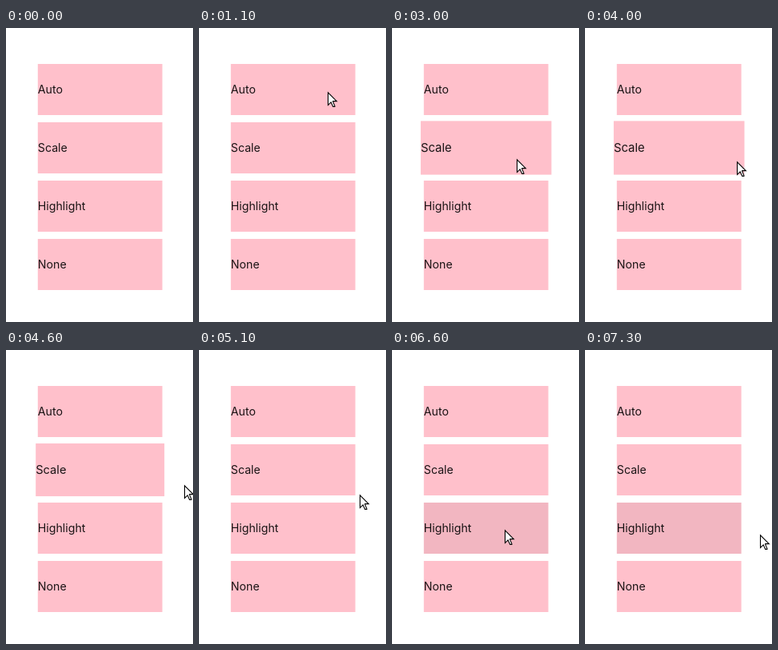
An HTML page that plays this animation: 234x368 px, repeating every 8000 ms.

```html
<!DOCTYPE html>
<html lang="en">
<head>
<meta charset="utf-8">
<title>Hover effects</title>
<style>
  html, body { margin: 0; width: 100%; height: 100%; overflow: hidden; background: #fff; }
  svg { display: block; }
  text { font: 14.2px Inter, "Noto Sans", sans-serif; fill: #000; fill-opacity: .9; }
</style>
</head>
<body>
<svg id="stage" width="234" height="368" viewBox="0 0 234 368"></svg>
<script>
const LOOP = 8000, TICK = 100;
const BOX = { x: 39.8, y: 45, w: 155.8, h: 64, pitch: 73 };
const START = [230, 133];

// Pointer moves: start time, ticks, end point, sideways bow
const MOVES = [
  [300, 4, 203, 100, 0],
  [800, 4, 161, 80, 0],
  [1800, 6, 156, 164, -7.5],
  [4000, 2, 223, 169, 0],
  [5000, 7, 112, 228, 0],
  [6600, 3, 225, 216, 0],
  [7200, 2, 219, 231, 0]
];

const stage = document.getElementById("stage");

function add(parent, tag, attrs, label) {
  const el = document.createElementNS(stage.namespaceURI, tag);
  for (const key in attrs) el.setAttribute(key, attrs[key]);
  if (label) el.textContent = label;
  parent.appendChild(el);
  return el;
}

const cards = ["Auto", "Scale", "Highlight", "None"].map((label, i) => {
  const y = BOX.y + i * BOX.pitch;
  const group = add(stage, "g", {});
  const area = { x: BOX.x, y, width: BOX.w, height: BOX.h };
  add(group, "rect", { ...area, fill: "#ffc0cb" });
  const shade = add(group, "rect", { ...area, fill: "#000", opacity: 0 });
  add(group, "text", { x: BOX.x, y: y + 37 }, label);
  return { group, shade, cx: BOX.x + BOX.w / 2, cy: y + BOX.h / 2 };
});

const pointer = add(stage, "path", {
  d: "M.5 .8V16.4L4.2 12.9L6.7 18.4H8.9V17.5L6.7 12.4V11.6H11.3Z",
  fill: "#fff", stroke: "#000", "stroke-width": 1.1
});

const ease = p => p * p * (3 - 2 * p);

// Progress in whole ticks, the first one landing at the start time
function steps(t, start, count) {
  const k = Math.floor((t - start) / TICK) + 1;
  return Math.max(0, Math.min(count, k)) / count;
}

const hover = (t, on, off) => steps(t, on, 3) - steps(t, off, 3);

function pointerAt(t) {
  let [x, y] = START;
  for (const [start, count, toX, toY, bow] of MOVES) {
    if (t < start) break;
    const e = ease(steps(t, start, count));
    x += (toX - x) * e + bow * 4 * e * (1 - e);
    y += (toY - y) * e;
  }
  return [x, y];
}

function draw(t) {
  const [x, y] = pointerAt(t);
  pointer.setAttribute("transform", `translate(${Math.round(x)} ${Math.round(y)})`);
  pointer.setAttribute("visibility", t < MOVES[0][0] ? "hidden" : "visible");

  const { group, cx, cy } = cards[1];
  const scale = 1 + 0.05 * hover(t, 2800, 4600);
  group.setAttribute("transform",
    `translate(${cx} ${cy}) scale(${scale}) translate(${-cx} ${-cy})`);

  cards[2].shade.setAttribute("opacity", 0.05 * hover(t, 6100, 7400));
}

const began = performance.now();
function frame() {
  draw((performance.now() - began) % LOOP);
  requestAnimationFrame(frame);
}
frame();
</script>
</body>
</html>
```
